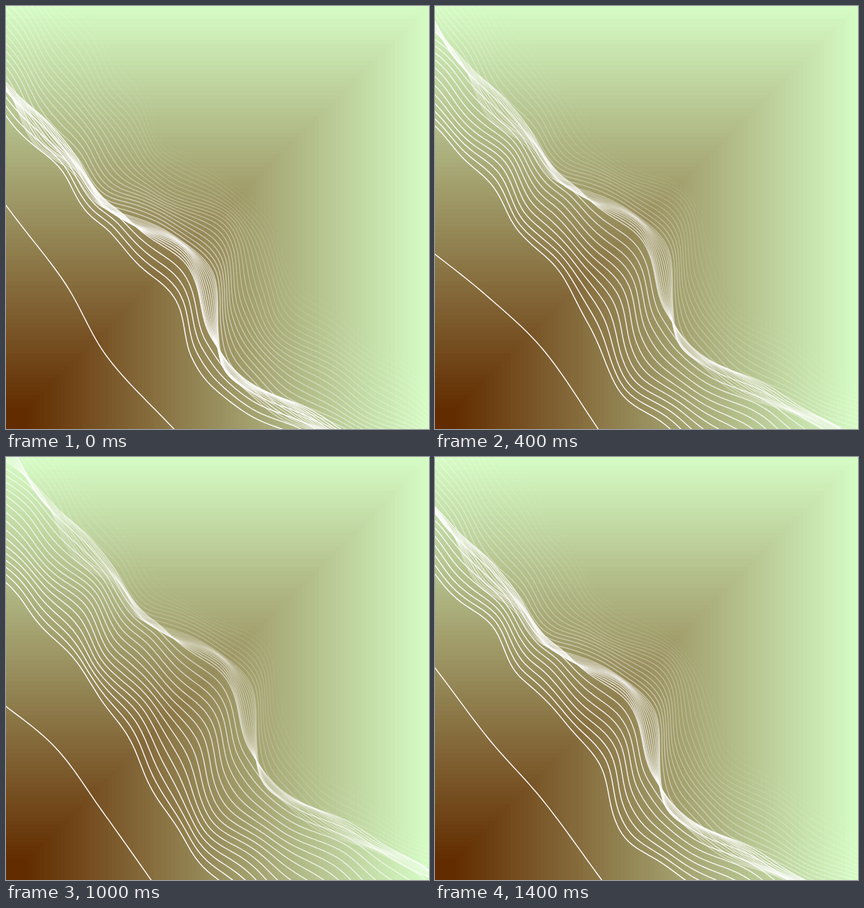
Recreate the animation shown at these times as an HTML page with a canvas. Size 600 by 600 pixels, loop 1.6 s.

```html
<!DOCTYPE html>
<html lang="en">
<head>
<meta charset="utf-8">
<title>Drifting lines</title>
<style>
html, body { margin: 0; width: 100%; height: 100%; overflow: hidden; }
canvas { display: block; width: 600px; height: 600px; }
</style>
</head>
<body>
<canvas id="stage" width="600" height="600"></canvas>
<script>
const ctx = document.getElementById('stage').getContext('2d');
const SIZE = 600, STEP = 200, TURN = 4;
const PER_STEP = 4;                  // new lines per step
const COUNT = 38;                    // lines on stage, fading with age
const DRIFT = 18.2;                  // shift to the upper right per step
const BAND_FROM = 20, BAND_TO = 32;  // lines that twist into a narrow band

// u runs down the falling diagonal, v across it: x = u + v, y = u - v
const ridge = [[40, 18], [120, 8], [160, 9], [205, 1], [235, 8], [300, 26],
  [335, 20], [380, -12], [415, -27], [455, -22], [527, 0], [582, 18]];

// leading line at u = 160, 240, 320 and 420, one row per step
const leads = [
  [-144, -155, -177, -181],
  [-151, -162, -167, -182],
  [-178, -169, -167, -185],
  [-179, -171, -183, -200],
  [-177, -175, -179, -211]
].map(row => row.map((v, i) => [[160, 240, 320, 420][i], v]));

const mix = (a, b, t) => a + (b - a) * t;
const smooth = t => {
  t = Math.min(1, Math.max(0, t));
  return t * t * (3 - 2 * t);
};

// smooth curve through points, straight beyond its ends
function curve(points, x) {
  const last = points.length - 1;
  const slope = i => {
    const a = points[Math.max(0, i - 1)], b = points[Math.min(last, i + 1)];
    return (b[1] - a[1]) / (b[0] - a[0]);
  };
  const beyond = i => points[i][1] + slope(i) * (x - points[i][0]);
  if (x <= points[0][0]) return beyond(0);
  if (x >= points[last][0]) return beyond(last);
  let i = 0;
  while (x > points[i + 1][0]) i++;
  const [x0, y0] = points[i], [x1, y1] = points[i + 1];
  const h = x1 - x0, t = (x - x0) / h, s = 1 - t;
  return s * s * ((1 + 2 * t) * y0 + t * h * slope(i)) +
         t * t * ((3 - 2 * t) * y1 - s * h * slope(i + 1));
}

// v of line k, counted from the newest
function sheet(u, k) {
  const mid = curve(ridge, u);
  const twist = 10 * Math.sin((u - 225) * Math.PI / 185);
  const wave = 2 * Math.sin(u / 15 + k * 0.3) + 1.5 * Math.sin(u / 26 - k * 0.4);
  if (k < BAND_FROM) {
    const low = -97 - 62 * smooth((u - 160) / 280);
    return mix(low, mid - twist, k / BAND_FROM) + wave;
  }
  if (k <= BAND_TO) {
    return mix(mid - twist, mid + twist, (k - BAND_FROM) / (BAND_TO - BAND_FROM)) + wave;
  }
  const spread = 112 + 26 * Math.cos((u - 100) / 60);
  return mid + twist + spread * (k - BAND_TO) / 24 + wave;
}

function background() {
  // nested squares towards the lower left corner
  const inner = 30, gap = 6;
  for (let s = SIZE; s >= inner; s -= gap) {
    const t = (s - inner) / (SIZE - inner);
    ctx.fillStyle = `rgb(${mix(98, 213, t)},${mix(44, 251, t)},${mix(0, 196, t)})`;
    ctx.fillRect(0, SIZE - s, s, s);
  }
}

function stroke(v, alpha) {
  ctx.strokeStyle = `rgba(255,255,255,${alpha})`;
  ctx.beginPath();
  for (let u = -20; u <= 660; u += 5) ctx.lineTo(u + v(u), u - v(u));
  ctx.stroke();
}

function draw(n) {
  const back = TURN - n;
  background();
  ctx.lineWidth = 1.4;
  ctx.lineJoin = 'round';
  for (let i = COUNT - 1; i >= 0; i--) {
    stroke(u => sheet(u, back * PER_STEP + i) - back * DRIFT, 1 - i / COUNT);
  }
  stroke(u => curve(leads[n], u), 1);
}

let shown = -1;
const start = performance.now();
function tick(now) {
  const step = Math.floor(Math.max(0, now - start) / STEP) % (2 * TURN);
  const n = step <= TURN ? step : 2 * TURN - step;
  if (n !== shown) draw(shown = n);
  requestAnimationFrame(tick);
}
tick(start);
</script>
</body>
</html>
```
